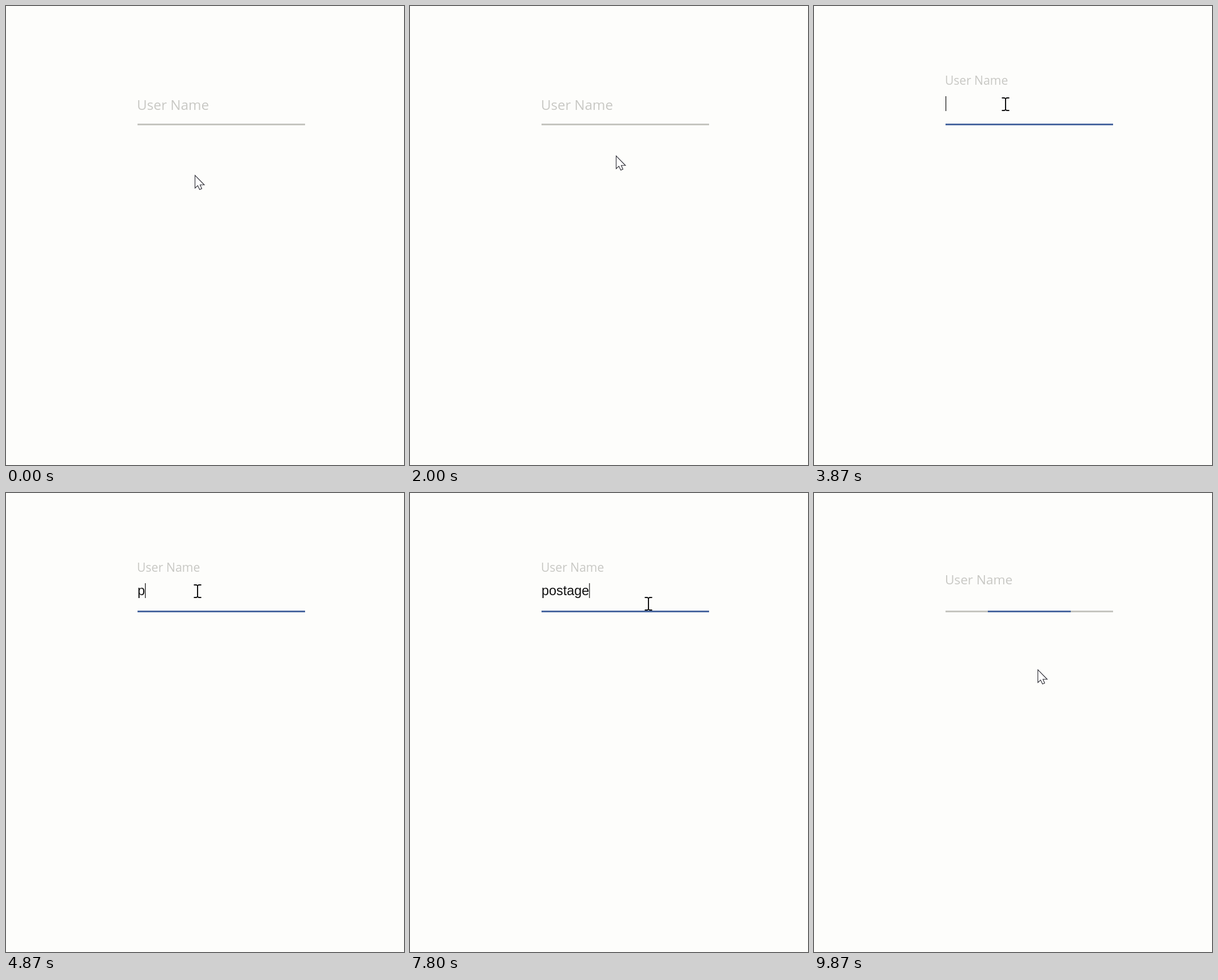
These frames come from a looping animation (696 by 804 pixels, 9.94 s). An HTML page:

```html
<!DOCTYPE html>
<html lang="en">
<head>
<meta charset="utf-8">
<title>Floating label input</title>
<style>
  html, body { margin: 0; width: 100%; height: 100%; overflow: hidden; background: #fdfdfb; }
  svg { display: block; width: 696px; height: 804px; }
  #label { font-family: "Open Sans", "Noto Sans", sans-serif; fill: #c8c8c4; }
  #value { font: 23.4px "Liberation Sans", Arial, sans-serif; fill: #111; }
</style>
</head>
<body>
<svg viewBox="0 0 696 804">
  <text id="label" x="228.9">User Name</text>
  <text id="value" x="230" y="179"></text>
  <rect id="caret" y="158" width="1.2" height="26" fill="#111"/>
  <rect x="230" y="206" width="293" height="3" fill="#c5c5bf"/>
  <rect id="bar" y="206" height="3" fill="#4a68a0"/>
  <path id="arrow" d="M.5 .5V23L5.3 18.6 8.6 25.6 12.4 24 9.4 17.3H16.8Z"
        fill="#fff" stroke="#2b2b33" stroke-width="1.1"/>
  <path id="beam" d="M-6.5-11H-2L0-9.7 2-11H6.5M0-9.7V9.7M-6.5 11H-2L0 9.7 2 11H6.5"
        fill="none" stroke="#111" stroke-width="2"/>
</svg>
<script>
const LOOP = 9940;
const NAME = "postage";
const FADE = 200;   // label and bar transition
const BLINK = 560;  // half a caret cycle

// when the field gains and loses focus
const spans = [[805, 1530], [2600, 3000], [3660, 9770]];

// pointer moves: start, end, x, y
const home = [330, 296];
const moves = [
  [130, 800, 381, 200],
  [1130, 1450, 372, 296],
  [1800, 2000, 360, 262],
  [2000, 2530, 380, 196],
  [2730, 3200, 476, 207],
  [3430, 3800, 335, 172],
  [6500, 6670, 350, 207],
  [6960, 7200, 372, 334],
  [7200, 7450, 490, 250],
  [7450, 7800, 417, 194],
  [9170, 9700, 391, 309]
];

const el = id => document.getElementById(id);
const [label, value, caret, bar, arrow, beam] =
  ["label", "value", "caret", "bar", "arrow", "beam"].map(el);
const set = (node, attrs) => {
  for (const k in attrs) node.setAttribute(k, attrs[k]);
};
const mix = (a, b, p) => a + (b - a) * p;
const progress = (t, from, to) => Math.min(1, Math.max(0, (t - from) / (to - from)));

// one letter, a pause, an even run of the rest, then an even run of deletions
const letters = [...NAME];
const typed = letters.map((_, i) => i ? 5530 + 120 * (i - 1) : 4530);
const erased = letters.map((_, i) => 8270 + 130 * i);
const resets = [...spans.map(s => s[0]), ...typed, ...erased];
const passed = (times, t) => times.filter(at => at <= t);

function focusAt(t) {
  return spans.reduce((sum, [on, off]) =>
    sum + progress(t, on, on + FADE) - progress(t, off, off + FADE), 0);
}

function caretOn(t) {
  if (!spans.some(([on, off]) => t >= on && t < off)) return false;
  return (t - Math.max(...passed(resets, t))) % (2 * BLINK) < BLINK;
}

function pointerAt(t) {
  return moves.reduce(([x, y], [from, to, nx, ny]) => {
    const p = progress(t, from, to);
    return [mix(x, nx, p), mix(y, ny, p)];
  }, home).map(Math.round);
}

function draw(t) {
  const p = focusAt(t);
  set(label, { y: mix(182, 137.7, p), "font-size": mix(24.1, 21.1, p) });
  set(bar, { x: 376.5 - 146.5 * p, width: 293 * p });

  const text = NAME.slice(0, passed(typed, t).length - passed(erased, t).length);
  if (value.textContent !== text) value.textContent = text;
  const width = text ? value.getComputedTextLength() : 0;
  set(caret, { x: 230 + width, opacity: caretOn(t) ? 1 : 0 });

  const [x, y] = pointerAt(t);
  const inField = x > 230 && x < 523 && y > 146 && y < 206;
  const transform = `translate(${x} ${y})`;
  set(arrow, { transform, opacity: inField ? 0 : 1 });
  set(beam, { transform, opacity: inField ? 1 : 0 });
}

const start = performance.now();
function tick() {
  draw((performance.now() - start) % LOOP);
  requestAnimationFrame(tick);
}
tick();
</script>
</body>
</html>
```
